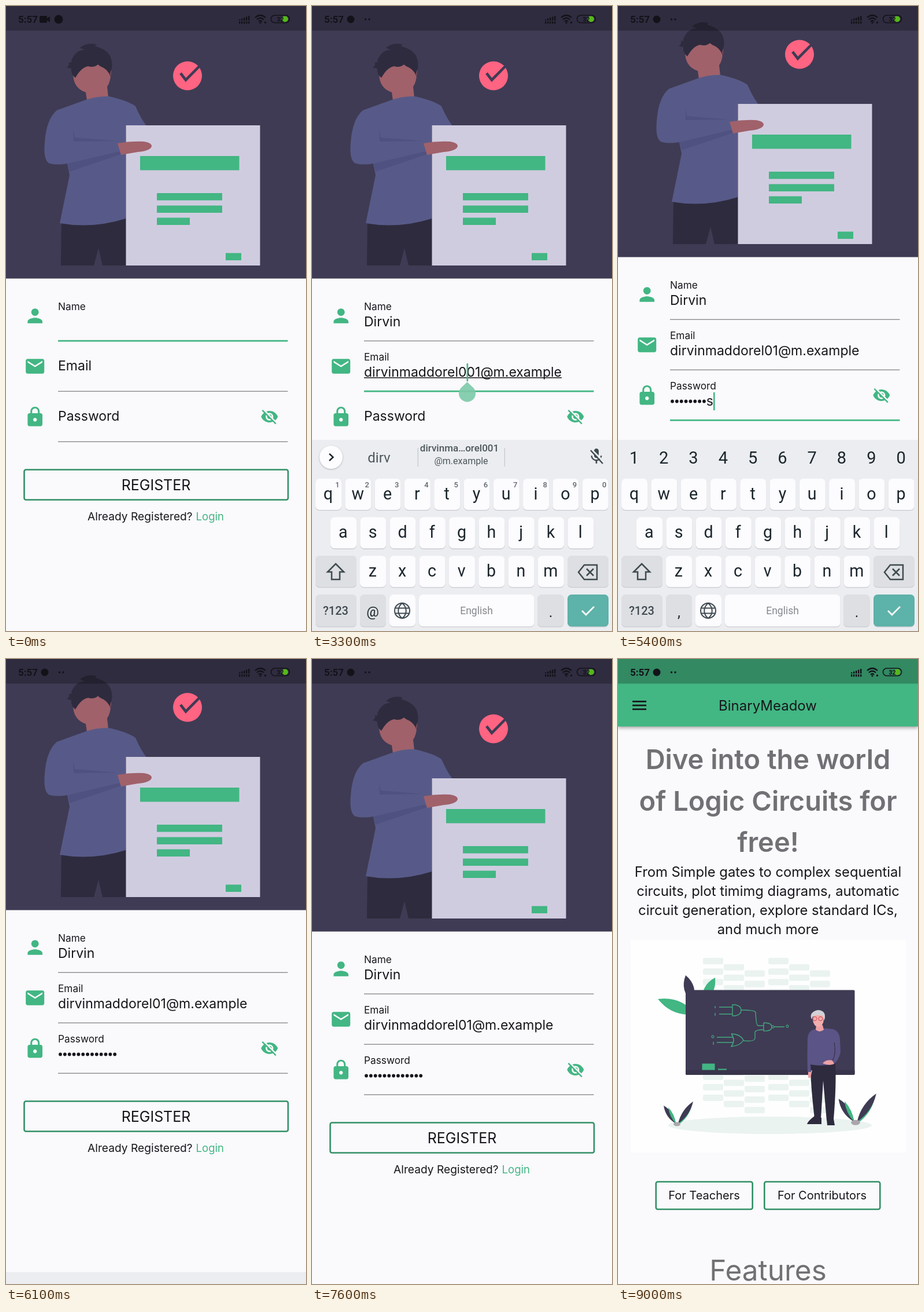
These frames come from a looping animation (519 px wide and 1079 px high, 9100 ms). An HTML page with a canvas:

```html
<!DOCTYPE html>
<html lang="en">
<head>
<meta charset="utf-8">
<title>Register flow</title>
<style>
html, body { margin: 0; width: 100%; height: 100%; overflow: hidden; background: #faf9fc; }
canvas { display: block; width: 100vw; height: 100vh; }
</style>
</head>
<body>
<canvas id="stage" width="519" height="1079"></canvas>
<script>
const ctx = document.getElementById('stage').getContext('2d');
const W = 519, H = 1079, LOOP = 9100;
const GREEN = '#42b683', DEEP = '#319066', INK = '#17161b', NIGHT = '#3f3b54',
  DARK = '#2e2b3e', PAGE = '#faf9fc', SKIN = '#a0616a', KEY_INK = '#1b262c';
const UI = 'Inter, "Open Sans", sans-serif', KB = 'Roboto, "Noto Sans", sans-serif';

const NAME = 'Dirvin', USER = 'dirvinmaddorel', HOST = '@m.example', SECRET = 'maplegrasstoo';
const T = { kbIn: 100, name: 650, email: 1900, typeMail: 2150, fill: 2750, handle: 3100,
  erase: 3450, pass: 3600, typePass: 4380, kbOut: 5950, auth: 6300, back: 6400, done: 7200, home: 7700, art: 8300 };

const clamp = v => Math.max(0, Math.min(1, v));
const ease = v => 1 - Math.pow(1 - clamp(v), 3);
const span = (t, start, len) => ease((t - start) / len);
const typed = (s, t, start, gap) => s.slice(0, Math.max(0, Math.floor((t - start) / gap) + 1));

function rect(x, y, w, h, color, r = 0) {
  ctx.fillStyle = color;
  ctx.beginPath();
  ctx.roundRect(x, y, w, h, r);
  ctx.fill();
}
function disc(x, y, r, color, ry = r) {
  ctx.fillStyle = color;
  ctx.beginPath();
  ctx.ellipse(x, y, r, ry, 0, 0, 7);
  ctx.fill();
}
function shape(d, color) {
  ctx.fillStyle = color;
  ctx.fill(new Path2D(d));
}
function line(d, color, width = 2) {
  ctx.strokeStyle = color;
  ctx.lineWidth = width;
  ctx.stroke(new Path2D(d));
}
function text(s, x, y, size, color = INK, align = 'left', font = UI, weight = 400) {
  ctx.font = `${weight} ${size}px ${font}`;
  ctx.textAlign = align;
  ctx.fillStyle = color;
  ctx.fillText(s, x, y);
}
function shadow(blur, dy, alpha, draw) {
  ctx.save();
  ctx.shadowColor = `rgba(0,0,0,${alpha})`;
  ctx.shadowBlur = blur;
  ctx.shadowOffsetY = dy;
  draw();
  ctx.restore();
}
function at(x, y, scale, draw) {
  ctx.save();
  ctx.translate(x, y);
  ctx.scale(scale, scale);
  draw();
  ctx.restore();
}
const icon = (d, x, y, scale, color) =>
  at(x - 12 * scale, y - 12 * scale, scale, () => shape(d, color));
function outline(x, y, w, h) {
  ctx.strokeStyle = DEEP;
  ctx.lineWidth = 2.6;
  ctx.beginPath();
  ctx.roundRect(x, y, w, h, 3);
  ctx.stroke();
}

const ICON = {
  person: 'M12 12c2.21 0 4-1.79 4-4s-1.79-4-4-4-4 1.79-4 4 1.79 4 4 4zm0 2c-2.67 0-8 1.34-8 4v2h16v-2c0-2.66-5.33-4-8-4z',
  mail: 'M20 4H4c-1.1 0-2 .9-2 2v12c0 1.1.9 2 2 2h16c1.1 0 2-.9 2-2V6c0-1.1-.9-2-2-2zm0 4l-8 5-8-5V6l8 5 8-5v2z',
  lock: 'M18 8h-1V6c0-2.76-2.24-5-5-5S7 3.24 7 6v2H6c-1.1 0-2 .9-2 2v10c0 1.1.9 2 2 2h12c1.1 0 2-.9 2-2V10c0-1.1-.9-2-2-2zm-6 9c-1.1 0-2-.9-2-2s.9-2 2-2 2 .9 2 2-.9 2-2 2zm3.1-9H8.9V6c0-1.71 1.39-3.1 3.1-3.1 1.71 0 3.1 1.39 3.1 3.1v2z',
  hidden: 'M12 7c2.76 0 5 2.24 5 5 0 .65-.13 1.26-.36 1.83l2.92 2.92c1.51-1.26 2.7-2.89 3.43-4.75-1.73-4.39-6-7.5-11-7.5-1.4 0-2.74.25-3.98.7l2.16 2.16C10.74 7.13 11.35 7 12 7zM2 4.27l2.28 2.28.46.46C3.08 8.3 1.78 10.02 1 12c1.73 4.39 6 7.5 11 7.5 1.55 0 3.03-.3 4.38-.84l.42.42L19.73 22 21 20.73 3.27 3 2 4.27zM7.53 9.8l1.55 1.55c-.05.21-.08.43-.08.65 0 1.66 1.34 3 3 3 .22 0 .44-.03.65-.08l1.55 1.55c-.67.33-1.41.53-2.2.53-2.76 0-5-2.24-5-5 0-.79.2-1.53.53-2.2zm4.31-.78l3.15 3.15.02-.16c0-1.66-1.34-3-3-3l-.17.01z',
  mic: 'M12 14c1.66 0 3-1.34 3-3V5c0-1.66-1.34-3-3-3S9 3.34 9 5v6c0 1.66 1.34 3 3 3zm5.3-3c0 3-2.54 5.1-5.3 5.1S6.7 14 6.7 11H5c0 3.41 2.72 6.23 6 6.72V21h2v-3.28c3.28-.48 6-3.3 6-6.72h-1.7z'
};

function statusBar(t) {
  const c = '#131219';
  rect(0, 0, W, 42.5, 'rgba(0,0,0,.25)');
  text('5:57', 21, 29, 17, c, 'left', KB, 600);
  if (t < T.email) {
    rect(58, 17, 13, 12, c, 2);
    shape('M70 22L76 18V28L70 24Z', c);
    disc(91, 23, 7.5, c);
  } else {
    disc(67, 23, 6.5, c);
    disc(92.5, 23, 1.7, c);
    disc(99, 23, 1.7, c);
  }
  for (let i = 0; i < 5; i++) {
    rect(403 + i * 4, 23 - i * 1.5, 2.4, 2 + i * 1.5, c);
    rect(403 + i * 4, 26.5, 2.4, 4, c);
  }
  line('M431 20Q440 12 449 20M434 23.5Q440 18 446 23.5M437 27Q440 24 443 27', c, 2.2);
  disc(440, 29, 1.6, c);
  rect(447, 27, 3, 3, c);
  rect(477, 17.5, 11, 10, '#55b81c', 5);
  line('M465 16H484A6.5 6.5 0 0 1 484 29H465A6.5 6.5 0 0 1 465 16Z', c, 1.6);
  text('32', 474.5, 26.5, 10.5, c, 'center', KB, 700);
}

function hero() {
  rect(0, -10, W, 480.5, NIGHT);
  shape('M96 372Q150 384 208 364V448H167L160 418L152 448H95Z', DARK);
  shape('M116 116Q116 142 138 149L140 163Q158 167 177 158L175 139Q182 130 182 105Q165 80 140 92Z', SKIN);
  shape('M120 124Q112 118 113 108L105 106Q112 101 108 97Q115 99 113 94Q121 75 136 76L128 72Q142 61 158 67Q152 67 156 70Q187 78 183 108Q179 116 181 123Q177 109 163 104L159 101Q152 107 142 104Q130 106 120 124Z', DARK);
  shape('M88 180L138 162Q158 155 178 156Q210 163 224 173Q232 192 243 207H207V367Q150 385 93 375L110 292L106 272Q90 275 76 272Q64 268 67 235Q70 195 88 180Z', '#575a88');
  shape('M116 213L119 227L193 233L117 234Z', '#4f5180');
  shape('M107 272L196 251L199 256L110 286Z', '#4f5180');
  rect(207.5, 206, 232, 242, '#d0cce0');
  shape('M193 237Q215 233 238 234Q252 236 252 242Q250 250 228 252L199 257Z', SKIN);
  [[232, 259, 171.5, 24.5], [261, 323, 113, 12.5], [261, 344.5, 113, 12.5], [261, 365.5, 57, 12.5], [380, 426.5, 27, 12.5]]
    .forEach(r => rect(...r, GREEN));
  disc(314, 120.5, 25, '#ff6482');
  line('M302 116L311 127.7L335 103.5', NIGHT, 4.6);
}

function field(label, y, focus, float, value) {
  if (focus) rect(90, y - 1.2, 397.5, 2.7, GREEN);
  else rect(90, y - .5, 397.5, 1.4, '#939296');
  text(label, 90, y - 36 - 17 * float, 23 - 5.75 * float);
  if (value) text(value, 90, y - 25, 23);
}
function caret(x, y) {
  rect(x, y - 48, 2.6, 31, GREEN);
}
function width(s) {
  ctx.font = `23px ${UI}`;
  return ctx.measureText(s).width;
}

function form(t) {
  const lift = t < T.back ? 37 * span(t, T.pass + 50, 250) : 37 * Math.exp((T.back - t) / 110);
  ctx.save();
  ctx.translate(0, -lift);
  hero();
  icon(ICON.person, 50.2, 535, 1.6, GREEN);
  icon(ICON.mail, 50.2, 622, 1.6, GREEN);
  icon(ICON.lock, 50.2, 709.4, 1.6, GREEN);
  icon(ICON.hidden, 455.8, 709, 1.32, GREEN);

  const on = t < T.email ? 0 : t < T.pass ? 1 : t < T.kbOut ? 2 : 3;
  const name = typed(NAME, t, T.name, 130);
  const digits = t < T.erase ? '001' : '01';
  const mail = t < T.fill ? typed(USER.slice(0, 4), t, T.typeMail, 130) : USER + digits + HOST;
  field('Name', 578, on === 0, 1, name);
  field('Email', 665, on === 1, span(t, T.email, 200), mail);
  field('Password', 752, on === 2, span(t, T.pass, 200));

  if (on === 0 && t > 300) caret(90 + width(name), 578);
  if (on === 1) {
    const inside = t >= T.handle;
    const x = 90 + width(inside ? USER + '0' : mail);
    if (mail) rect(90, 641, width(mail), 1.5, INK);
    caret(x, 665);
    if (inside && t < T.erase)
      shape(`M${x + 1} 649L${x + 11.5} 659A14.5 14.5 0 1 1 ${x - 9.5} 659Z`, 'rgba(125,202,169,.9)');
  }
  const n = typed(SECRET, t, T.typePass, 120).length;
  const open = n > 0 && t < T.kbOut;
  const dots = open ? n - 1 : n, end = 90 + dots * 7.85;
  for (let i = 0; i < dots; i++) disc(94 + i * 7.85, 719.5, 2.9, INK);
  if (open) text(SECRET[n - 1], end, 727, 23);
  if (on === 2) caret(end + (open ? width(SECRET[n - 1]) : 0), 752);

  if (t >= T.auth && t < T.done) {
    shadow(4, 2, .4, () => rect(32, 801, 455.5, 51, DEEP, 3));
    text('Authenticating..', 259.5, 836, 28.5, '#fff', 'center');
  } else {
    outline(31.5, 800.5, 456.5, 52);
    text('REGISTER', 259.5, 836, 25, INK, 'center');
  }
  text('Already Registered?', 141, 888, 19.2);
  text('Login', 328.5, 888, 18.6, GREEN);
  ctx.restore();
}

function key(x, y, w, color = '#fcfbfe', h = 54) {
  rect(x, y + 1.3, w, h, '#c9cacf', 7);
  rect(x, y, w, h, color, 7);
}
function suggestions(t) {
  const mailing = t >= T.email, c = '#4d575c';
  shadow(3, 1, .25, () => disc(33, 779, 20, '#fdfcfe'));
  line('M30 773L36.5 779L30 785', KEY_INK, 2.4);
  icon(ICON.mic, 492, 777.5, 1.35, '#3f4a50');
  if (mailing) {
    line('M483 765L505 787', '#ebedf0', 3);
    line('M482 767L503 790', '#3f4a50', 2.4);
  }
  const word = mailing ? typed(USER.slice(0, 4), t, T.typeMail, 130) : t > T.name + 780 ? 'Maddorel' : '';
  if (!word) return;
  rect(182.7, 763, 1.2, 32, '#c3c5c9');
  rect(332.7, 763, 1.2, 32, '#c3c5c9');
  text(word, 116, 788, 24, c, 'center', KB);
  if (mailing) {
    text('dirvinma…orel001', 255, 769, 17, c, 'center', KB, 500);
    text(HOST, 258, 791, 16, c, 'center', KB);
  } else {
    text('Tumav', 258, 788, 24, c, 'center', KB);
    text("Tumav's", 400, 788, 24, c, 'center', KB);
  }
}
function keyboard(t) {
  const up = t < T.kbOut ? span(t, T.kbIn, 300) : 1 - span(t, T.kbOut, 250);
  if (up <= 0) return;
  const secret = t >= T.pass, grey = '#dddfe2', pitch = 51.3, low = 55.3;
  ctx.save();
  ctx.translate(0, 330 * (1 - up));
  rect(0, 749, W, 331, '#ebedf0');
  if (!secret) suggestions(t);
  ['qwertyuiop', 'asdfghjkl', 'zxcvbnm'].forEach((row, r) => {
    const x0 = [6, 32, 83][r], y = 816 + r * 66.6;
    [...row].forEach((ch, i) => {
      const x = x0 + i * pitch, mid = x + 21.9;
      key(x, y, 45);
      text(ch, mid, y + 35.5, 28.6, KEY_INK, 'center', KB);
      if (r) return;
      const d = String((i + 1) % 10);
      if (secret) text(d, mid, 790, 29, KEY_INK, 'center', KB);
      else text(d, x + 38, 831, 13, '#5f676c', 'center', KB, 500);
    });
  });
  key(6, 949, 71, grey);
  line('M41 963L55 977H48V990H34V977H27Z', '#3f4a50', 2.5);
  key(442, 949, 71, grey);
  line('M471 965H493V990H471L461 977.5ZM475 971.5L487 983.5M487 971.5L475 983.5', '#3f4a50', 2.5);

  key(6, 1016, 71, grey, low);
  text('?123', 41, 1051, 20, '#3f4a50', 'center', KB, 500);
  key(83, 1016, 45, grey, low);
  if (secret) text(',', 105.5, 1055, 25, KEY_INK, 'center', KB);
  else if (t >= T.email) text('@', 105, 1054, 24, KEY_INK, 'center', KB);
  else {
    text(',', 105.5, 1056, 25, KEY_INK, 'center', KB);
    line('M112 1032.5A6.7 6.7 0 1 1 112 1032.4M101.5 1034Q105.3 1039 109 1034', '#3f4a50', 1.5);
    disc(103, 1030.5, 1.1, '#3f4a50');
    disc(107.6, 1030.5, 1.1, '#3f4a50');
  }
  key(134, 1016, 45, undefined, low);
  line('M169 1044A13 13 0 1 1 169 1043.9M156 1031C147 1038 147 1050 156 1057C165 1050 165 1038 156 1031M144 1039.5H168M144 1048.5H168', '#3f4a50', 2);
  key(185, 1016, 199.5, undefined, low);
  text('English', 284.5, 1050, 17.5, '#85898d', 'center', KB);
  key(390, 1016, 45.5, grey, low);
  text('.', 413, 1055, 25, KEY_INK, 'center', KB);
  key(442, 1016, 71, '#5db2a9', low);
  line('M467 1044L474 1051L488 1037', '#fff', 2.8);
  ctx.restore();
}

function leaf(x0, y0, x1, y1, w, color) {
  const mx = (x0 + x1) / 2, my = (y0 + y1) / 2, len = Math.hypot(x1 - x0, y1 - y0);
  const nx = (y0 - y1) / len * w, ny = (x1 - x0) / len * w;
  shape(`M${x0} ${y0}Q${mx + nx} ${my + ny} ${x1} ${y1}Q${mx - nx} ${my - ny} ${x0} ${y0}Z`, color);
}
function plant(x, y, s) {
  at(x, y, s, () => {
    leaf(-2, 0, -23, -31, 9, NIGHT);
    leaf(-2, 0, -15, -28, 5, GREEN);
    leaf(4, 1, 27, -37, 9, GREEN);
    leaf(2, 0, 28, -38, 9, NIGHT);
    disc(0, 1, 6, '#a9a7ab', 3.5);
  });
}
function teacher() {
  shape('M333 698H376Q378 735 373 795L361 797L355 728L351 793L340 793Q333 735 333 698Z', DARK);
  shape('M340 789L352 792V803H327Q328 798 340 789Z', DARK);
  shape('M361 794H373L375 805H362Z', DARK);
  shape('M329 712L336 710L333 723H329Z', '#eda1a4');
  shape('M335 641Q349 635 372 639Q383 642 384 657L385 679Q382 692 374 699Q350 704 333 700L334 713H328Q327 685 328 655Q329 645 335 641Z', '#5b5486');
  shape('M343 632H354L356 640Q349 646 342 640Z', '#eda1a4');
  disc(346.5, 622, 9.5, '#f2adad', 13);
  shape('M335 622Q331 614 338 609Q347 603 355 609Q360 614 357 624L354 616Q345 613 337 617Z', '#d3d1d6');
  line('M344 621A3.5 3.5 0 1 1 344 620.9M354 621A3.5 3.5 0 1 1 354 620.9', '#d4565f', 1.1);
  shape('M354 698Q360 691 371 693L374 699Q365 703 354 698Z', '#eda1a4');
  line('M374 662Q378 680 371 694', DARK, 1);
}
function circuit() {
  const c = '#42a87d';
  line('M198 597H203Q213 599 213 606Q213 614 203 616H198ZM175 601H198M175 613H198M168 599V603M168 611V616', c, 1.4);
  line('M196 647Q212 648 217 658Q211 668 196 669Q204 658 196 647M171 653H199M171 662H199M165 661V666', c, 1.4);
  line('M213 606Q237 606 238 610Q239 632 242 633H252M217 659Q236 661 237 655V644Q238 640 252 640', c, 1.4);
  line('M252 628V642Q266 643 266 635Q266 628 252 628M270 635H288', c, 1.4);
  [[164, 652], [268, 635], [293, 634]].forEach(p => line(`M${p[0] + 2} ${p[1]}a2 2 0 1 1 0 -.1`, c, 1.2));
}
function artwork() {
  for (let i = 0; i < 6; i++)
    for (let k = 0; k < 14; k++)
      rect(147 + (i % 3) * 36 + (i > 2 ? 113 : 0), 516 + (i % 3) * 10.7 + k * 18.15, 35, 11, '#eaf3f0', 3);
  disc(263, 805, 176, '#eaf3f0', 15);
  leaf(129, 592, 117, 546, 17, NIGHT);
  leaf(134, 613, 69, 587, 20, GREEN);
  leaf(146, 592, 168, 550, 16, GREEN);
  rect(117, 571.5, 292.5, 146.5, NIGHT, 2);
  rect(117, 709.5, 292.5, 8.5, '#38344b', 2);
  rect(145.5, 698.5, 22, 11, GREEN);
  rect(173, 707.5, 15, 2, GREEN);
  circuit();
  teacher();
  plant(102, 802, 1);
  plant(411, 799, 1.28);
}

function home(t) {
  const p = span(t, T.home, 300);
  if (p <= 0) return;
  const soft = '#717074';
  ctx.save();
  ctx.globalAlpha = p;
  ctx.translate(0, 110 * (1 - p));
  rect(0, 0, W, H, PAGE);
  shadow(6, 2, .35, () => rect(0, -10, W, 126.5, GREEN));
  for (let i = 0; i < 3; i++) rect(25, 72 + i * 6.7, 24, 2.7, INK);
  text('BinaryMeadow', 259, 89, 24, INK, 'center');
  ['Dive into the world', 'of Logic Circuits for', 'free!'].forEach((s, i) =>
    text(s, 259.5, 190 + i * 71.5, 47, soft, 'center', UI, 600));
  ['From Simple gates to complex sequential', 'circuits, plot timimg diagrams, automatic',
    'circuit generation, explore standard ICs,', 'and much more'].forEach((s, i) =>
    text(s, 259.5, 376 + i * 33, 23.8, INK, 'center'));
  rect(22, 484.5, 476, 367.5, '#fefefe');
  ctx.save();
  ctx.globalAlpha = p * clamp((t - T.art) / 400);
  if (t > T.art) artwork();
  ctx.restore();
  outline(65.7, 902.5, 167, 47.5);
  outline(253.3, 902.5, 200, 47.5);
  text('For Teachers', 149, 933, 20, INK, 'center');
  text('For Contributors', 353, 933, 20, INK, 'center');
  text('Features', 259.5, 1073, 49.5, soft, 'center');
  ctx.restore();
}

function draw(now) {
  const t = now % LOOP;
  rect(0, 0, W, H, PAGE);
  if (t < T.home + 300) form(t);
  keyboard(t);
  home(t);
  statusBar(t);
  requestAnimationFrame(draw);
}
requestAnimationFrame(draw);
</script>
</body>
</html>
```
